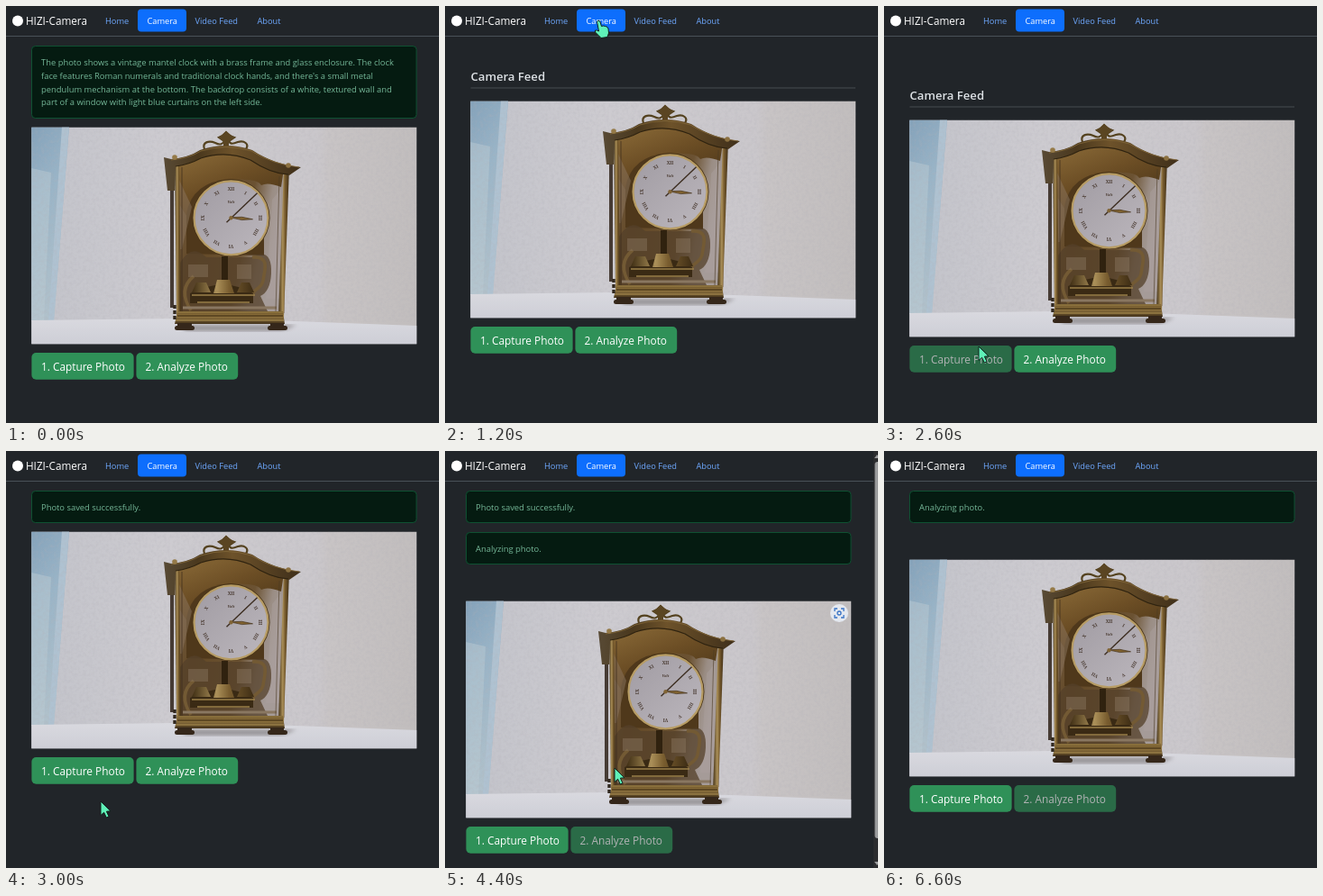
Animation, 480 px wide and 463 px high, one loop 8 s. Source, as an HTML page:

```html
<!DOCTYPE html>
<html lang="en">
<head>
<meta charset="utf-8">
<title>Camera</title>
<style>
  html, body { margin: 0; width: 100%; height: 100%; overflow: hidden; background: #212529; }
  svg { display: block; width: 100%; height: 100%; }
  text { font-family: "Open Sans", "Noto Sans", sans-serif; white-space: pre; }
  .nav { font-size: 9.25px; fill: #6ea8fe; }
  .alert rect { fill: #051b11; stroke: #0f5132; }
  .alert text { font-size: 9.4px; fill: #75b798; }
  .btn rect { fill: #2f9158; }
  .btn text { font-size: 11.85px; fill: #fff; }
  #dial text { font: bold 5px "Noto Serif", serif; fill: #4a3b32; text-anchor: middle; }
</style>
</head>
<body>
<svg viewBox="0 0 480 463" preserveAspectRatio="none">
  <defs>
    <linearGradient id="wall">
      <stop offset="0" stop-color="#c2c3ca"/><stop offset=".35" stop-color="#cdcbd0"/>
      <stop offset=".74" stop-color="#cac7cb"/><stop offset=".77" stop-color="#c8c4c5"/>
      <stop offset="1" stop-color="#c1bdbd"/>
    </linearGradient>
    <linearGradient id="pane" x2=".25" y2="1">
      <stop offset="0" stop-color="#84a2ba"/><stop offset=".4" stop-color="#99b4c7"/>
      <stop offset="1" stop-color="#b0c1cb"/>
    </linearGradient>
    <linearGradient id="table" x2="0" y2="1">
      <stop offset="0" stop-color="#d9d9df"/><stop offset="1" stop-color="#cdced6"/>
    </linearGradient>
    <linearGradient id="brass">
      <stop offset="0" stop-color="#3f2e14"/><stop offset=".4" stop-color="#ab9059"/>
      <stop offset=".6" stop-color="#795d2f"/><stop offset="1" stop-color="#3d2c14"/>
    </linearGradient>
    <linearGradient id="bar" x2="0" y2="1">
      <stop offset="0" stop-color="#553f1c"/><stop offset=".35" stop-color="#987b43"/>
      <stop offset="1" stop-color="#43321a"/>
    </linearGradient>
    <linearGradient id="roof">
      <stop offset="0" stop-color="#584a35"/><stop offset=".25" stop-color="#4a381d"/>
      <stop offset=".5" stop-color="#6d522a"/><stop offset="1" stop-color="#3f2f1a"/>
    </linearGradient>
    <linearGradient id="glass" x2="1" y2=".3">
      <stop offset="0" stop-color="#7b6650"/><stop offset=".3" stop-color="#624826"/>
      <stop offset=".72" stop-color="#6b5232"/><stop offset=".88" stop-color="#9a8d84"/>
      <stop offset="1" stop-color="#a59b98"/>
    </linearGradient>
    <linearGradient id="dome" x2=".6" y2="1">
      <stop offset="0" stop-color="#8c6c39"/><stop offset=".5" stop-color="#6c4e25"/>
      <stop offset="1" stop-color="#4b3518"/>
    </linearGradient>
    <linearGradient id="face" x2="1" y2="1">
      <stop offset="0" stop-color="#a09ba2"/><stop offset="1" stop-color="#bcb7bd"/>
    </linearGradient>
    <filter id="grain" x="0" y="0" width="1" height="1">
      <feTurbulence type="fractalNoise" baseFrequency=".28" numOctaves="2" seed="4"/>
      <feColorMatrix values="0 0 0 0 .45  0 0 0 0 .44  0 0 0 0 .48  1.6 0 0 0 -.68"/>
    </filter>
    <filter id="soft"><feGaussianBlur stdDeviation="2"/></filter>
    <filter id="lensBlur"><feGaussianBlur stdDeviation=".45"/></filter>
    <clipPath id="crop"><path d="M28.3 -.2h426.9v240.4h-426.9z"/></clipPath>
  </defs>
  <rect width="480" height="463" fill="#212529"/>

  <path d="M0 33.5H480" stroke="#495057"/>
  <circle cx="13" cy="16.5" r="6" fill="#fff"/>
  <text x="22" y="21" font-size="11.7" fill="#fff">HIZI-Camera</text>
  <rect x="146" y="3.6" width="54" height="25" rx="4" fill="#0d6efd"/>
  <text class="nav" x="110" y="20">Home</text>
  <text class="nav" x="156.5" y="20" style="fill:#fff">Camera</text>
  <text class="nav" x="209.5" y="20">Video Feed</text>
  <text class="nav" x="278.5" y="20">About</text>

  <g id="page">
    <g id="alerts"></g>
    <g id="head">
      <text x="28.5" y="-23" font-size="13.1" font-weight="600" fill="#dee2e6">Camera Feed</text>
      <path d="M28.5 -15H455" stroke="#474c50"/>
    </g>
    <g id="photo">
      <g clip-path="url(#crop)">
        <path d="M28 -1h428v242h-428z" fill="url(#wall)"/>
        <path d="M28 -1H70L53 215H28z" fill="url(#pane)"/>
        <path d="M28 45L50 50L42 215H28z" fill="#bccbd3" opacity=".5"/>
        <path d="M62 -1H70L53 215H47z" fill="#afc2d1"/>
        <path d="M28 -1h428v217h-428z" filter="url(#grain)" opacity=".36"/>
        <path d="M28 214L188 212L320 215L456 220V241H28z" fill="url(#table)"/>
        <path d="M190 219H322L306 226H200z" fill="#706a6c" opacity=".6" filter="url(#soft)"/>
        <g id="clock" filter="url(#lensBlur)">
          <!-- finial -->
          <path d="M220 24C217 16 225 14 232 17C238 20 240 18 242 15L236 11L240 9L244 5L248 9L253 11L247 15C249 19 252 18 257 16C264 14 270 18 266 24" fill="none" stroke="#54421f" stroke-width="2.2"/>
          <path d="M244 4L253 11L247 15V23H241V15L236 11z" fill="#5a4522"/>
          <!-- case -->
          <path d="M189 40Q244 10 309 46V206H189z" fill="url(#glass)"/>
          <path d="M190 38Q244 12 308 46L305 66Q290 60 283 64Q278 56 249 58Q210 62 204 104L190 82z" fill="url(#dome)"/>
          <path d="M200 140V96Q206 60 249 57Q284 60 286 92V142z" fill="#4f381b"/>
          <path d="M191 56L206 88L195 135H191z" fill="#8c7761" opacity=".5"/>
          <path d="M305 68L295 80L288 190H303z" fill="#aaa09d" opacity=".45"/>
          <!-- pendulum -->
          <path d="M193 150Q206 128 222 144H272Q295 132 294 162Q293 182 282 187L290 204H193z" fill="#54402a" opacity=".75"/>
          <path d="M273 144C294 142 286 160 285 170C283 180 274 178 272 188M205 203Q190 180 208 165" fill="none" stroke="#735a34" stroke-width="3.6"/>
          <path d="M202 152H224V166H202zM256 152H272V168H256z" fill="#897660" opacity=".45"/>
          <path d="M239 143H246V172H239z" fill="#30220f"/>
          <path d="M204 184Q242 165 274 184V195H204z" fill="#3a2a14"/>
          <path d="M211 172H222L227 183H206zM234 169H248L253 184H230zM261 172H270L275 183H256z" fill="url(#brass)"/>
          <path d="M206 186H276M212 194H270" stroke="#9b8049" stroke-width="1.3"/>
          <path d="M196 200H300" stroke="#897761" stroke-width="3"/>
          <!-- frame -->
          <path d="M182 60H186V200H182z" fill="#463b34"/>
          <path d="M187 34H192L194 211H189z" fill="url(#brass)"/>
          <path d="M195 44V204" stroke="#38291a" opacity=".7"/>
          <path d="M308 43H314L308 211H302z" fill="url(#brass)"/>
          <path d="M303 54L299 204" stroke="#4a3924" opacity=".6"/>
          <path d="M175 33L183 35Q203 33 215 25Q244 15 273 25Q297 41 327 44L314 53Q293 51 271 36Q244 25 216 34Q202 41 188 43L187 70L179 70z" fill="url(#roof)"/>
          <path d="M183 36Q203 34 216 26Q244 17 272 26Q296 41 325 44" fill="none" stroke="#806638" stroke-width=".9"/>
          <path d="M188 43Q203 41 216 34Q244 25 271 36Q293 51 313 52" fill="none" stroke="#2f2310" stroke-width="1.2"/>
          <circle cx="187" cy="33" r="2.8" fill="#957a48"/><circle cx="313" cy="42" r="2.8" fill="#8b7040"/>
          <path d="M190 204H307L309 218H187z" fill="url(#bar)"/>
          <path d="M190 205H307M188 214H308" stroke="#ad9152"/>
          <path d="M190 209H307" stroke="#4c391a" stroke-width="1.4"/>
          <path d="M187 197V213" stroke="#31281f" stroke-width="3.4" stroke-dasharray="4 2"/>
          <g fill="#35271a">
            <rect x="190" y="217" width="16" height="4"/><rect x="187" y="220" width="22" height="5" rx="2.5"/>
            <rect x="293" y="217" width="15" height="4"/><rect x="290" y="220" width="22" height="5" rx="2.5"/>
          </g>
          <g id="dial" transform="translate(249.5 100.3)">
            <circle r="43" fill="#4a3517"/>
            <circle r="41" fill="url(#face)" stroke="#b79c64" stroke-width="2.2"/>
            <g id="hours"></g>
            <text y="-16" style="font-size:4.2px;font-style:italic">Velt</text>
            <path d="M-5 5L29 -27.5" fill="none" stroke="#3c2d20" stroke-width="1.4"/>
            <path d="M-1 -.5L12 -1L24 1.5L12 2.3z" fill="#80622f" stroke="#46341f" stroke-width=".7"/>
            <circle r="2.2" fill="#806435"/>
          </g>
        </g>
      </g>
      <g id="lens" transform="translate(442 13)">
        <circle r="10" fill="#e4e8ef"/>
        <path d="M-5 -2V-5H-2M2 -5H5V-2M5 2V5H2M-2 5H-5V2" fill="none" stroke="#3973c5" stroke-width="1.3"/>
        <circle r="2" fill="none" stroke="#3973c5" stroke-width="1.3"/>
      </g>
      <g class="btn" id="btn1">
        <rect x="28.4" y="250" width="113.2" height="29.8" rx="5"/>
        <text x="39" y="269.5">1. Capture Photo</text>
      </g>
      <g class="btn" id="btn2">
        <rect x="144.4" y="250" width="112.8" height="29.8" rx="5"/>
        <text x="154.5" y="269.5">2. Analyze Photo</text>
      </g>
    </g>
  </g>

  <g id="scroll">
    <path d="M475 0H480V463H475z" fill="#2b2c2e"/>
    <rect x="476.5" y="12" width="6" height="418" rx="3" fill="#9b9c9d"/>
    <path d="M476 8L479 4L482 8zM476 456L479 460L482 456z" fill="#9b9c9d"/>
  </g>
  <g id="cursor" fill="#5ff2b8" stroke="#10201c" stroke-linejoin="round">
    <path id="arrow" d="M0 0V15.5L3.6 12.3L6.3 18L9 16.8L6.4 11.2L11 10.8z"/>
    <path id="hand" d="M-1.5 1.5Q0 -1 1.8 1L3.5 6.5L5.5 6L7.5 6.5L9.5 7L11 9L11.5 14L10 18.5L3 19.5L-3.5 13Q-4.5 10 -1.5 11L.5 12z"/>
  </g>
</svg>
<script>
const $ = id => document.getElementById(id);
const LOOP = 8000, STEP = 200;

const saved = ["Photo saved successfully."], busy = ["Analyzing photo."];
const report = [
  "The photo shows a vintage mantel clock with a brass frame and glass enclosure. The clock",
  "face features Roman numerals and traditional clock hands, and there's a small metal",
  "pendulum mechanism at the bottom. The backdrop consists of a white, textured wall and",
  "part of a window with light blue curtains on the left side."
];

// y: top of the photo, off: number of the disabled button
const scenes = [
  { at: 0, y: 135, alerts: [report] },
  { at: 1000, y: 106, head: true },
  { at: 2400, y: 127, head: true, off: 1 },
  { at: 3000, y: 90, alerts: [saved] },
  { at: 4200, y: 121, alerts: [saved], off: 2 },
  { at: 4400, y: 167, alerts: [saved, busy], off: 2, scroll: true },
  { at: 4600, y: 121, alerts: [busy], off: 2 }
];

// pointer stops: time, x, y
const stops = [
  [200, 400, 440], [1000, 170, 16], [1200, 170, 16], [2200, 105, 378], [2600, 105, 378],
  [3000, 105, 389], [3400, 105, 389], [4000, 188, 352], [4400, 188, 352],
  [4600, 209, 350], [5200, 490, 318]
];

$("hours").innerHTML = "XII I II III IIII V VI VII VIII IX X XI".split(" ")
  .map((n, i) => `<text y="-30" transform="rotate(${i * 30})">${n}</text>`).join("");

function alertBox(lines, y) {
  const rows = lines.map((s, i) => `<text x="39" y="${y + 21.7 + i * 14.9}">${s}</text>`).join("");
  return `<g class="alert"><rect x="28.5" y="${y + .5}" width="426.5"
    height="${35 + (lines.length - 1) * 15}" rx="4"/>${rows}</g>`;
}

function pointer(t) {
  const i = stops.findIndex(s => s[0] > t);
  if (i < 1) return null;
  const [t0, x0, y0] = stops[i - 1], [t1, x1, y1] = stops[i];
  const u = (t - t0) / (t1 - t0), e = u * u * (3 - 2 * u);
  return [x0 + (x1 - x0) * e, y0 + (y1 - y0) * e];
}

const show = (id, on) => $(id).setAttribute("visibility", on ? "visible" : "hidden");
const move = (id, x, y) => $(id).setAttribute("transform", `translate(${x} ${y})`);
const inside = (p, x, y, w, h) => !!p && p[0] >= x && p[0] <= x + w && p[1] >= y && p[1] <= y + h;

let current;
function setScene(s) {
  if (s === current) return;
  current = s;
  $("alerts").innerHTML = (s.alerts || []).map((a, i) => alertBox(a, 44 + i * 46)).join("");
  move("page", s.scroll ? -5 : 0, 0);
  move("photo", 0, s.y);
  move("head", 0, s.y);
  show("head", s.head);
  show("scroll", s.scroll);
  for (const n of [1, 2]) $("btn" + n).setAttribute("opacity", s.off === n ? .65 : 1);
}

function render(time) {
  const t = Math.floor(time % LOOP / STEP) * STEP;
  const s = scenes.filter(c => c.at <= t).pop();
  setScene(s);
  const p = pointer(t);
  show("lens", inside(p, 28, s.y, 427, 240));
  const hand = inside(p, 146, 4, 54, 25)
    || s.off !== 1 && inside(p, 28, s.y + 250, 113, 30)
    || s.off !== 2 && inside(p, 144, s.y + 250, 113, 30);
  show("arrow", p && !hand);
  show("hand", hand);
  if (p) move("cursor", ...p);
}

const start = performance.now();
function tick() {
  render(performance.now() - start);
  requestAnimationFrame(tick);
}
tick();
</script>
</body>
</html>
```
